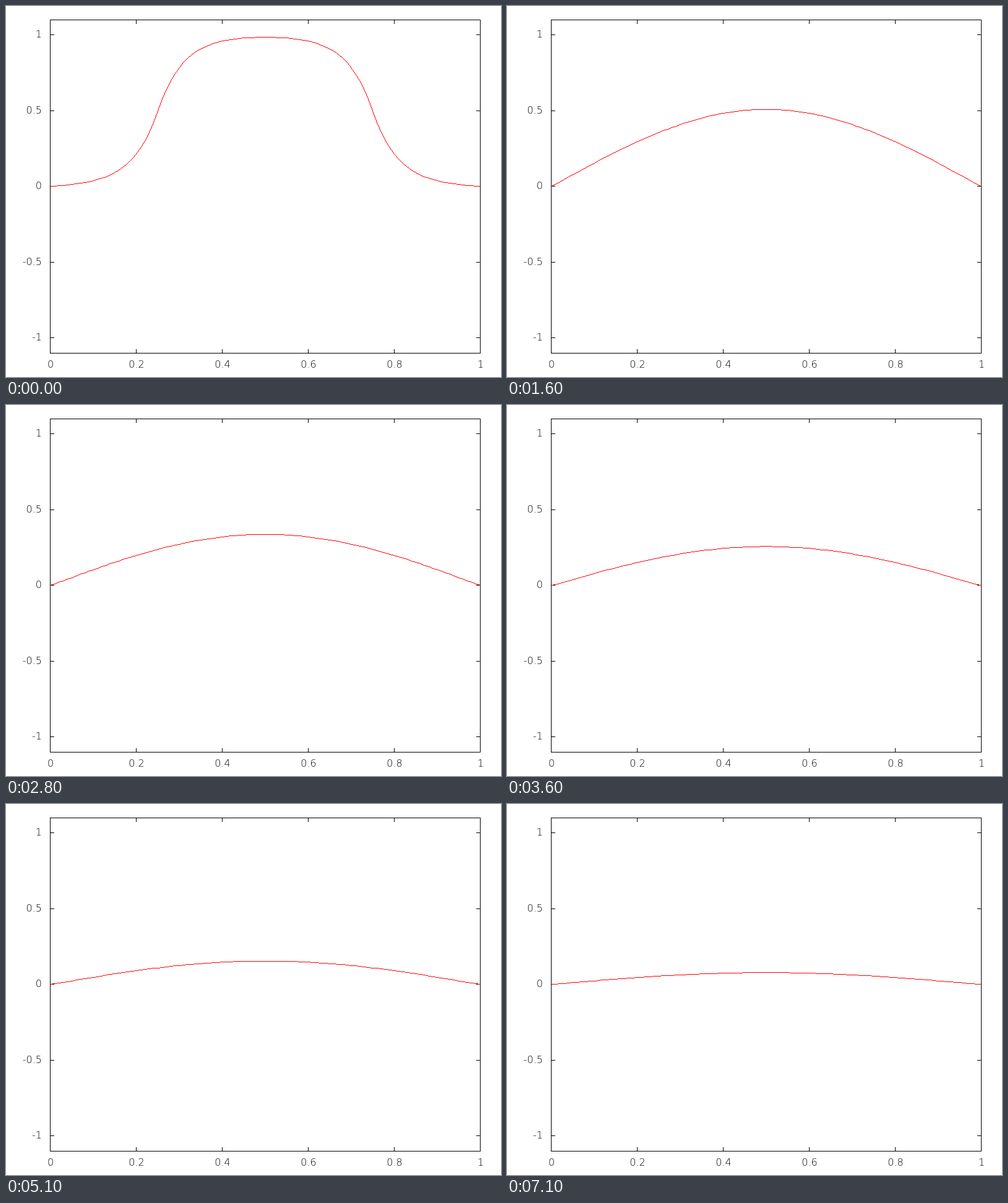
Animation of 800 by 600 pixels, one loop 7.2 s. Source, as an HTML page with a canvas:

```html
<!DOCTYPE html>
<html lang="en">
<head>
<meta charset="utf-8">
<title>Heat diffusion</title>
<style>
  html, body { margin: 0; width: 100%; height: 100%; overflow: hidden; background: #fff; }
  svg, canvas { position: absolute; top: 0; left: 0; display: block; }
  path { fill: none; stroke: #000; shape-rendering: crispEdges; }
  text { font: 200 16px "DejaVu Sans Light", "DejaVu Sans", sans-serif; fill: #000; }
</style>
</head>
<body>
<svg id="axes" width="800" height="600"></svg>
<canvas id="plot" width="800" height="600"></canvas>
<script>
const LEFT = 71, RIGHT = 766, TOP = 22, BOTTOM = 561;
const ZERO = 291, UNIT = 245;
const STEP_MS = 100, STEPS = 72;
const POINTS = 100, MODES = 199;
const DECAY = 0.0344; // diffusion per implicit step, scaled by pi squared

const toX = x => LEFT + Math.floor((RIGHT - LEFT) * x + 0.5);
const toY = u => ZERO - Math.floor(UNIT * u + 1e-6);

function drawAxes() {
  let d = `M${LEFT}.5 ${TOP}.5H${RIGHT}.5V${BOTTOM}.5H${LEFT}.5Z`;
  let labels = "";
  for (let i = 0; i <= 5; i++) {
    const x = toX(i / 5);
    d += `M${x}.5 ${TOP}v7M${x}.5 ${BOTTOM + 1}v-7`;
    labels += `<text x="${x + 1}" y="585" text-anchor="middle">${i / 5}</text>`;
  }
  for (let i = -2; i <= 2; i++) {
    const y = toY(i / 2);
    d += `M${LEFT} ${y}.5h7M${RIGHT + 1} ${y}.5h-7`;
    labels += `<text x="58" y="${y + 5}" text-anchor="end">${i / 2}</text>`;
  }
  document.getElementById("axes").innerHTML = `<path d="${d}"/>${labels}`;
}

// Sine series of a unit block on [1/4, 3/4] after n implicit diffusion steps
function heat(x, n) {
  let sum = 0;
  for (let k = 1; k <= MODES; k += 2) {
    const amp = 4 / (k * Math.PI) * Math.cos(k * Math.PI / 4);
    sum += amp * Math.sin(k * Math.PI * x) / (1 + DECAY * k * k) ** n;
  }
  return sum;
}

const ctx = document.getElementById("plot").getContext("2d");
ctx.fillStyle = "#f00";
ctx.beginPath();
ctx.rect(LEFT + 1, TOP + 1, RIGHT - LEFT - 1, BOTTOM - TOP - 1);
ctx.clip();

// Hard-edged line, one pixel wide
function line(x0, y0, x1, y1) {
  const len = Math.max(Math.abs(x1 - x0), Math.abs(y1 - y0), 1);
  for (let i = 0; i <= len; i++) {
    const t = i / len;
    ctx.fillRect(Math.round(x0 + (x1 - x0) * t), Math.round(y0 + (y1 - y0) * t), 1, 1);
  }
}

function drawCurve(step) {
  ctx.clearRect(0, 0, 800, 600);
  let px = LEFT, py = ZERO;
  for (let i = 1; i <= POINTS; i++) {
    // The profile is symmetric about the middle
    const x = toX(i / POINTS);
    const y = toY(heat(Math.min(i, POINTS - i) / POINTS, step + 1));
    line(px, py, x, y);
    px = x;
    py = y;
  }
}

let shown = -1;
function tick() {
  const step = Math.floor(performance.now() / STEP_MS) % STEPS;
  if (step !== shown) drawCurve(shown = step);
  requestAnimationFrame(tick);
}

drawAxes();
tick();
</script>
</body>
</html>
```
